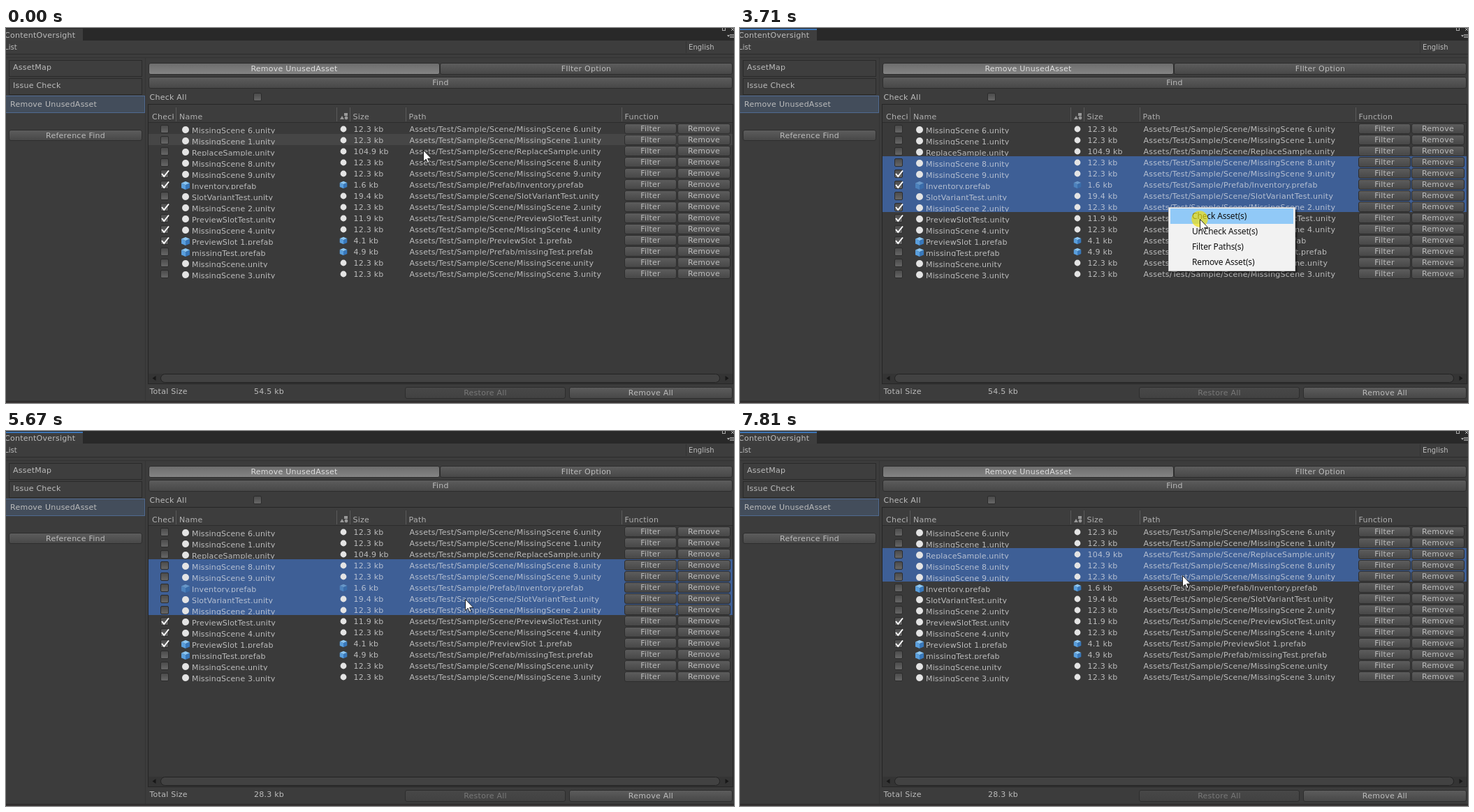
Write an HTML page that moves like this. It is 1042 px wide and 538 px high and loops after 8 s.

```html
<!DOCTYPE html>
<html lang="en">
<head>
<meta charset="utf-8">
<title>Asset window</title>
<style>
html, body { margin: 0; width: 100%; height: 100%; overflow: hidden; background: #3c3c3c; }
svg { display: block; }
text { font: 11px "DejaVu Sans", sans-serif; letter-spacing: .25px; fill: #bcbcbc; white-space: pre; }
.name { letter-spacing: .15px; }
.bar { font-size: 10px; letter-spacing: .1px; }
.head { fill: #b0b0b0; }
.lit { fill: #dedede; }
.off { fill: #787878; }
.menu { font: 12px "Noto Sans", sans-serif; letter-spacing: -.15px; fill: #111; }
.row .bg { fill: none; }
.row.idle .bg { fill: #464646; }
.row.on .bg { fill: #3e5f96; }
.row.on text.cell { fill: #b6c0d2; }
.row.on .cube { opacity: .55; }
.tick { visibility: hidden; }
.checked .tick { visibility: visible; }
</style>
</head>
<body>
<svg id="stage" width="1042" height="538" viewBox="0 0 1042 538" xmlns="http://www.w3.org/2000/svg">
  <defs>
    <linearGradient id="btn" x2="0" y2="1">
      <stop stop-color="#5d5d5d"/><stop offset="1" stop-color="#474747"/>
    </linearGradient>
    <linearGradient id="down" x2="0" y2="1">
      <stop stop-color="#6c6c6c"/><stop offset="1" stop-color="#858585"/>
    </linearGradient>
    <linearGradient id="dim" x2="0" y2="1">
      <stop stop-color="#484848"/><stop offset="1" stop-color="#414141"/>
    </linearGradient>
    <linearGradient id="box" x2="0" y2="1">
      <stop stop-color="#4a4a4a"/><stop offset="1" stop-color="#686868"/>
    </linearGradient>
    <g id="check">
      <rect x=".5" y=".5" width="11" height="11" rx="1.5" fill="url(#box)" stroke="#2c2c2c"/>
    </g>
    <g id="cube">
      <path d="M6 0L12 2.6L6 5.2L0 2.6Z" fill="#8cc6f2"/>
      <path d="M0 2.6L6 5.2V12L0 9.4Z" fill="#5a9fdd"/>
      <path d="M12 2.6L6 5.2V12L12 9.4Z" fill="#3878bb"/>
    </g>
  </defs>
  <g id="ui"></g>
  <g id="menu"></g>
  <circle id="click" r="11.7" fill="#f0e010" fill-opacity=".7"/>
  <path id="cursor" d="M.5 .5V16.6L4.2 13.2L6.6 18.6L9 17.6L6.6 12.3H11.8Z" fill="#fff" stroke="#111" stroke-width=".9"/>
</svg>
<script>
const $ = id => document.getElementById(id);
const LOOP = 8000, TOP = 136, ROW = 16;

const rect = (x, y, w, h, fill, more = '') =>
  `<rect x="${x}" y="${y}" width="${w}" height="${h}" fill="${fill}" ${more}/>`;
const text = (x, y, s, cls = '', more = '') =>
  `<text x="${x}" y="${y}" class="${cls}" ${more}>${s}</text>`;
const frame = (x, y, w, h, fill, line, r = 0) =>
  rect(x + .5, y + .5, w - 1, h - 1, fill, `stroke="${line}" rx="${r}"`);
const button = (x, y, w, h, s, fill = 'url(#btn)', cls = '') =>
  frame(x, y, w, h, fill, '#2d2d2d', 2.5) +
  text(x + w / 2, Math.round(y + h / 2 + 3.5), s, cls, 'text-anchor="middle"');

const scene = (name, size) => ({ file: name + '.unity', dir: 'Scene/', size });
const prefab = (name, dir, size) => ({ file: name + '.prefab', dir, size, cube: true });
const missing = n => scene('MissingScene' + n, 12.3);
const assets = [
  missing(' 6'), missing(' 1'), scene('ReplaceSample', 104.9), missing(' 8'), missing(' 9'),
  prefab('Inventory', 'Prefab/', 1.6), scene('SlotVariantTest', 19.4), missing(' 2'),
  scene('PreviewSlotTest', 11.9), missing(' 4'), prefab('PreviewSlot 1', '', 4.1),
  prefab('missingTest', 'Prefab/', 4.9), missing(''), missing(' 3')
];

function assetRow(a, i) {
  const y = TOP + i * ROW;
  const icon = (x, cy, s) => a.cube
    ? `<use href="#cube" class="cube" transform="translate(${x - 6 * s} ${cy - 6 * s}) scale(${s})"/>`
    : `<circle cx="${x}" cy="${cy}" r="${5 * s}" fill="#e4e4e4"/>`;
  return `<g class="row"><rect class="bg" x="204" y="${y}" width="836" height="${ROW}"/>
    <use href="#check" x="221" y="${y + 3}"/>
    <path class="tick" d="M223 ${y + 9}l3.2 4l6.8 -8.5" fill="none" stroke="#fff" stroke-width="2"/>
    ${icon(257, y + 10, 1)}${icon(483, y + 9, .88)}
    <svg x="266" y="${y}" width="206" height="15.5">${text(0, 15, a.file, 'name cell')}</svg>
    ${text(497.5, y + 13, a.size.toFixed(1) + ' kb', 'cell')}
    ${text(577.5, y + 13, 'Assets/Test/Sample/' + a.dir + a.file, 'cell')}
    ${button(885, y + 1, 75, 15, 'Filter')}${button(961, y + 1, 76, 15, 'Remove')}</g>`;
}

function buildUi() {
  const columns = [[248, 'Name'], [496.5, 'Size'], [576.5, 'Path'], [885.5, 'Function']];
  return [
    // tab strip and toolbar
    rect(0, 0, 1042, 18, '#292929'),
    rect(0, 1, 110, 18, '#3e3e3e'),
    '<rect id="focus" x="0" y="1" width="110" height="2" fill="#3d76b8"/>',
    text(-2, 14, 'ContentOversight'),
    rect(0, 18, 1042, 19, '#3d3d3d'), rect(0, 37, 1042, 1, '#2c2c2c'),
    text(-2, 31, 'List', 'bar'), text(977, 31, 'English', 'bar'),
    rect(973, 19, 1, 17, '#333'),
    frame(1025, -1, 5, 5, 'none', '#aaa'),
    '<path d="M1038 0l4 4M1042 0l-4 4M1036 9.5h6M1036 11.5h6M1036 13.5h6" stroke="#aaa"/>',
    '<path d="M1032 10h4l-2 3z" fill="#aaa"/>',
    // sidebar
    rect(0, 42, 1042, 1, '#333'), rect(199, 43, 1, 492, '#343434'),
    frame(4, 46, 191, 24, '#3e3e3e', '#2a2a2a'), text(10, 60, 'AssetMap'),
    frame(4, 72, 191, 24, '#3e3e3e', '#2a2a2a'), text(10, 86, 'Issue Check'),
    frame(-1, 97, 200, 25, '#434d5b', '#506b92'), text(6, 113, 'Remove UnusedAsset'),
    button(4, 146, 191, 16, 'Reference Find'),
    // panel buttons
    button(204, 50, 417, 17, 'Remove UnusedAsset', 'url(#down)', 'lit'),
    button(621, 50, 419, 17, 'FIlter Option'),
    button(204, 70, 836, 17, 'Find'),
    text(205.5, 103, 'Check All'), '<use href="#check" x="354" y="93"/>',
    // table
    frame(203, 109, 838, 402, '#3a3a3a', '#262626'),
    rect(204, 110, 836, 26, '#3d3d3d'), rect(204, 135, 836, 1, '#2c2c2c'),
    `<svg x="204" y="110" width="36" height="26">${text(5, 21, 'Check', 'head')}</svg>`,
    ...columns.map(([x, s]) => text(x, 131, s, 'head')),
    ...[243, 473, 492, 572, 881].map(x => rect(x, 114, 1, 20, '#5a5a5a')),
    '<path d="M484 126v-4h5v4zM478 131l3 -5l3 5z" fill="#999"/><circle cx="487" cy="129" r="2.4" fill="#999"/>',
    ...assets.map(assetRow),
    // scrollbar and footer
    rect(204, 496, 836, 14, '#343434'),
    frame(221, 496, 801, 13, '#424242', '#222', 6),
    '<path d="M214.500 499v7l-5 -3.500zM1029.500 499v7l5 -3.500z" fill="#171717"/>',
    text(205.5, 525, 'Total Size'), text(355, 525, '', '', 'id="total"'),
    button(571, 515, 230, 17, 'Restore All', 'url(#dim)', 'off'),
    button(806, 515, 234, 17, 'Remove All'),
    rect(0, 535, 1042, 1, '#292929'), rect(0, 536, 1042, 2, '#383434')
  ].join('');
}

function menuMarkup(x, y, items, hover) {
  const h = items.length * 22 + 4;
  return rect(x + 4, y + 4, 182, h, '#000', 'opacity=".18"') +
    rect(x + 3, y + 3, 181, h - 1, '#000', 'opacity=".3"') +
    frame(x, y, 182, h, '#f2f2f2', '#c4c4c4') +
    (hover ? rect(x + 3, y + 2, 176, 22, '#91c9f7') : '') +
    items.map((s, i) => text(x + 34, y + 17 + i * 22, s, 'menu')).join('');
}

// cursor hops: first change, last change, number of changes, end point
const moves = [
  [280, 370, 2, 602, 188], [920, 1440, 8, 613, 256], [2790, 2790, 1, 616, 258],
  [3160, 3250, 2, 658, 274], [3880, 4410, 8, 604, 221], [4800, 4960, 3, 656, 241],
  [5360, 5360, 1, 657, 241], [6140, 6390, 4, 625, 175], [6780, 6950, 3, 633, 207]
];
const clicks = [[1620, 1690], [2150, 2300], [3710, 3800], [4560, 4640], [5510, 5590],
  [5750, 5830], [6610, 6690], [7170, 7260], [7720, 7810]];
// start time, first and last selected row
const picks = [[0, 1, 1], [680, 3, 3], [1620, 3, 7], [5750, 6, 6], [6610, 2, 2], [7170, 2, 4]];
const actions = ['Check Asset(s)', 'UnCheck Asset(s)', 'Filter Paths(s)', 'Remove Asset(s)'];
const menus = [
  { from: 2790, hover: 3160, to: 3800, x: 613, y: 257, items: actions },
  { from: 4720, hover: 4800, to: 5590, x: 603, y: 222, items: actions.slice(1) }
];

const ease = p => p * p * (3 - 2 * p);

function cursorAt(t) {
  let x = 597, y = 175;
  for (const [from, to, n, ex, ey] of moves) {
    if (t < from) break;
    const gap = n > 1 ? (to - from) / (n - 1) : 1;
    const p = ease(Math.min(n, Math.floor((t - from) / gap + 1e-6) + 1) / n);
    x += (ex - x) * p;
    y += (ey - y) * p;
  }
  return [Math.round(x), Math.round(y)];
}

function isChecked(i, t) {
  if (i >= 3 && i <= 7 && t >= 3800) return t < 5590;
  return i >= 4 && i <= 10 && i !== 6;
}

$('ui').innerHTML = buildUi();
const rows = [...document.querySelectorAll('.row')];
let menuKey = '';

function draw(t) {
  const focused = t >= 680;
  $('focus').style.display = focused ? '' : 'none';

  const [, first, last] = picks.filter(p => t >= p[0]).pop();
  let total = 0;
  rows.forEach((row, i) => {
    const picked = i >= first && i <= last, checked = isChecked(i, t);
    row.setAttribute('class', 'row' + (picked ? focused ? ' on' : ' idle' : '') + (checked ? ' checked' : ''));
    if (checked) total += assets[i].size;
  });
  $('total').textContent = total.toFixed(1) + ' kb';

  const m = menus.find(m => t >= m.from && t < m.to);
  const key = m ? m.from + ':' + (t >= m.hover) : '';
  if (key !== menuKey) {
    $('menu').innerHTML = m ? menuMarkup(m.x, m.y, m.items, t >= m.hover) : '';
    menuKey = key;
  }

  const place = `translate(${cursorAt(t)})`;
  $('cursor').setAttribute('transform', place);
  $('click').setAttribute('transform', place);
  $('click').style.display = clicks.some(([a, b]) => t >= a && t < b) ? '' : 'none';
}

const start = performance.now();
function tick() {
  draw((performance.now() - start) % LOOP);
  requestAnimationFrame(tick);
}
tick();
</script>
</body>
</html>
```
